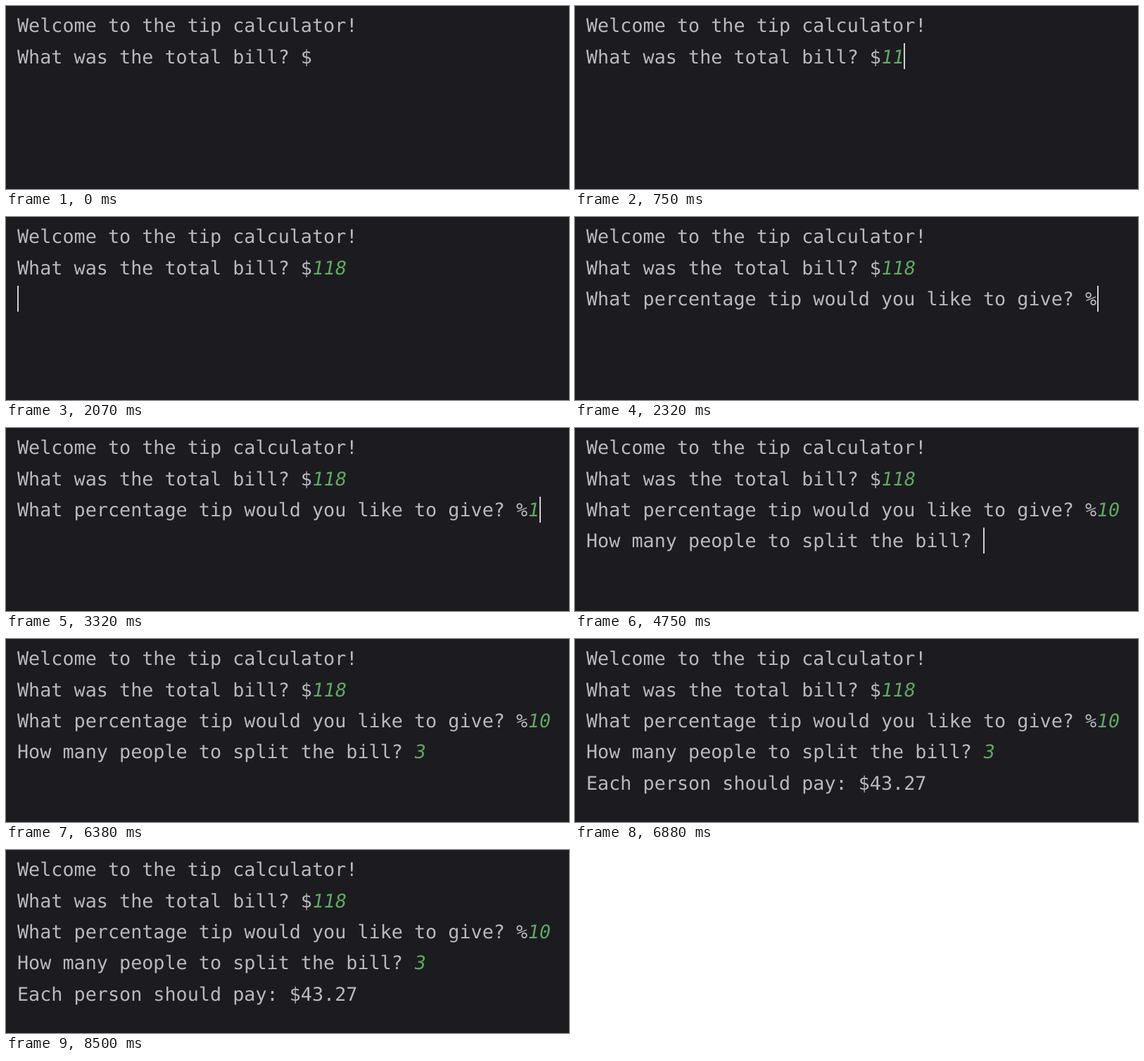
Write an HTML page that moves like this. It is 800 px wide and 261 px high and loops after 8.75 s.

```html
<!DOCTYPE html>
<html lang="en">
<head>
<meta charset="utf-8">
<title>Tip calculator</title>
<style>
  html, body { margin: 0; width: 100%; height: 100%; overflow: hidden; background: #1c1b1f; }
  svg { display: block; width: 800px; height: 261px; }
  text {
    font: 26.78px "DejaVu Sans Mono", "Noto Sans Mono", monospace;
    fill: #b9babd; white-space: pre; text-rendering: geometricPrecision;
  }
  .typed { fill: #5fa865; }
  #caret { fill: #cfd1d6; }
</style>
</head>
<body>
<svg viewBox="0 0 800 261"><rect id="caret" width="2" height="37"/></svg>
<script>
const LOOP = 8750, LEFT = 16, CELL = 16.123, BASE = 37.3, PITCH = 44.3;
const svg = document.querySelector("svg"), caret = document.getElementById("caret");
const colX = col => LEFT + col * CELL;
const rowY = row => BASE + row * PITCH;

// Each line: text, time it is printed, answer, time of each answer key
const lines = [
  { text: "Welcome to the tip calculator!", at: 0 },
  { text: "What was the total bill? $", at: 0, answer: "118", keys: [500, 750, 1190] },
  { text: "What percentage tip would you like to give? %", at: 2250, answer: "10", keys: [3130, 3820] },
  { text: "How many people to split the bill? ", at: 4690, answer: "3", keys: [5880] },
  { text: "Each person should pay: $43.27", at: 6690 }
];

// Moments that place the caret and restart its blink: time, row, column
const moves = [[380, 1, 26], [1940, 2, 0], [2250, 2, 45], [4690, 3, 35], [6570, 4, 0]];
lines.forEach((line, row) => (line.keys || []).forEach((t, i) =>
  moves.push([t, row, line.text.length + i + 1])));
moves.sort((a, b) => a[0] - b[0]);

function addText(x, y, skew) {
  const el = document.createElementNS("http://www.w3.org/2000/svg", "text");
  el.setAttribute("transform", `translate(${x} ${y}) skewX(${skew})`);
  svg.insertBefore(el, caret);
  return el;
}

lines.forEach((line, row) => {
  line.label = addText(LEFT, rowY(row), 0);
  line.label.textContent = line.text;
  if (!line.answer) return;
  line.input = addText(colX(line.text.length) - 1.5, rowY(row), -10);
  line.input.setAttribute("class", "typed");
});

function draw(t) {
  for (const line of lines) {
    line.label.style.display = t >= line.at ? "" : "none";
    if (line.input) {
      line.input.textContent = line.answer.slice(0, line.keys.filter(k => t >= k).length);
    }
  }
  const move = moves.filter(m => t >= m[0]).pop();
  const lit = move && t < 6690 && (t - move[0]) % 1000 < 500;
  caret.style.display = lit ? "" : "none";
  if (lit) {
    caret.setAttribute("x", Math.round(colX(move[2])));
    caret.setAttribute("y", Math.round(rowY(move[1]) - 28.4));
  }
}

const start = performance.now();
function tick() {
  draw((performance.now() - start) % LOOP);
  requestAnimationFrame(tick);
}
tick();
</script>
</body>
</html>
```
